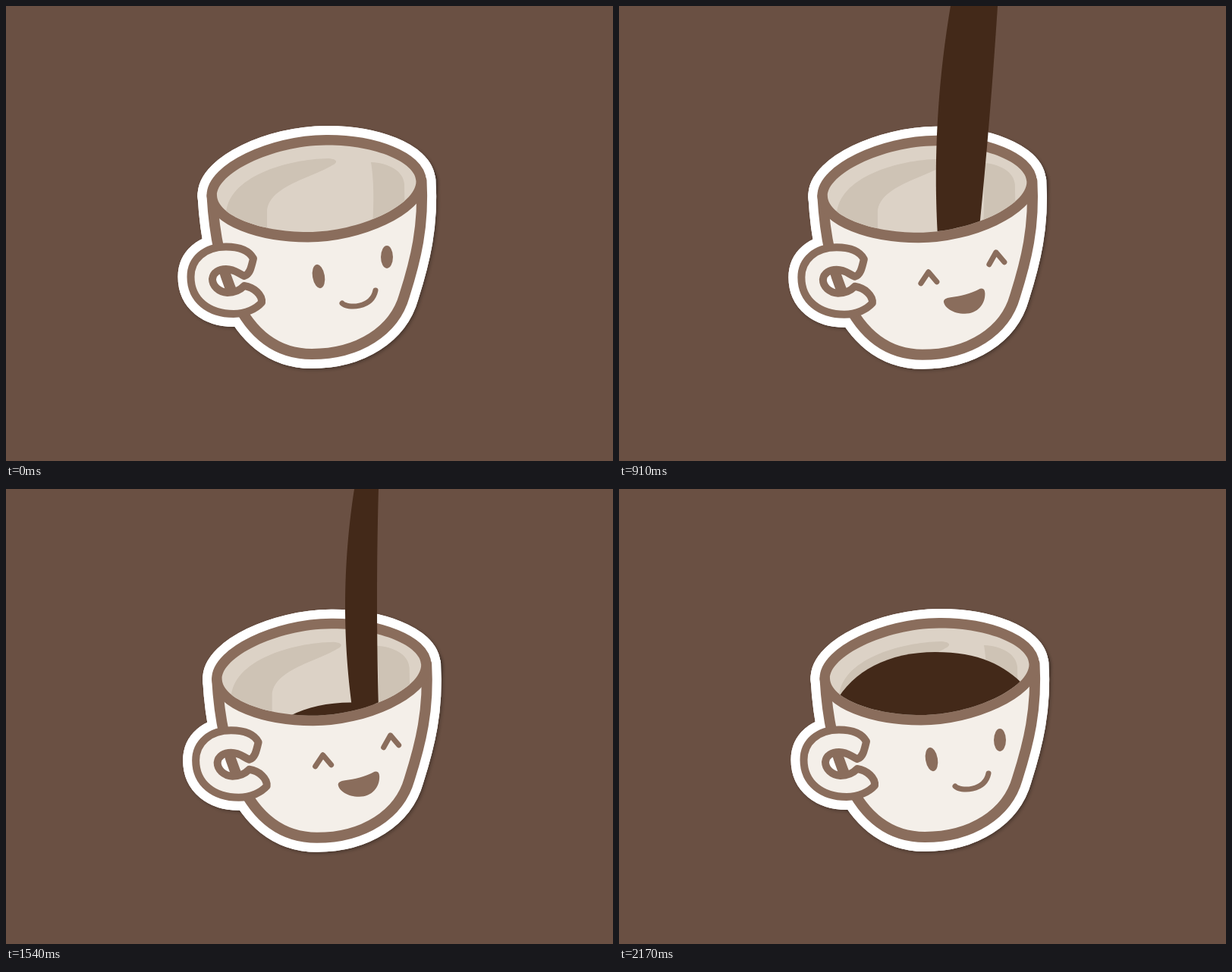
Write an HTML page with a canvas that moves like this. It is 800x600 px and loops after 4340 ms.

```html
<!DOCTYPE html>
<html lang="en">
<head>
<meta charset="utf-8">
<title>Coffee cup</title>
<style>
html, body { margin: 0; width: 100%; height: 100%; overflow: hidden; background: #6a5043; }
canvas { display: block; }
</style>
</head>
<body>
<canvas id="stage" width="800" height="600"></canvas>
<script>
const ctx = document.getElementById('stage').getContext('2d');
const LOOP = 4340, START = 350, STEP = 70, LAST = 26;
const BG = '#6a5043', LINE = '#8a6d5c', CREAM = '#f4efe9', INNER = '#dcd2c6',
      SHADE = '#cec3b5', COFFEE = '#432919';

const body = new Path2D('M271.5 250C276 330 302 459 403 459C465 459 512 428 525 382C540 335 551 290 547.5 230Z');
const front = 'C541 262 466 298 398 298C334 298 279 276 278 250';
const rim = new Path2D('M278 250C277 222 348 184 422 183.5C486 183 540 206 540.5 231' + front + 'Z');
const pourArea = new Path2D('M278 -20L541 -20L540.5 231' + front + 'Z');
const handle = new Path2D('M326 333C320 322 306 317.5 290 317.5C262 317.5 243.5 334 243.5 357' +
  'C243.5 388 268 406 300 406C316 406 330 399 337 391C338 381 327 371 314 369' +
  'C307 376 301 378 292 378C280 377 272 369 272 360C273 351 281 347 290 347' +
  'C302 347 306 353 314 356C321 354 323 346 326 333Z');
const leftShade = new Path2D('M290 275C292 225 370 202 425 201C438 202 437 207 430 210' +
  'C400 228 345 238 344 272L344 300L290 300Z');
const rightShade = new Path2D('M481 206C485 230 485 260 483 290L526 290L525 235C524 218 505 207 481 206Z');
const surface = new Path2D('M285 282C308 240 355 215 417 215C474 215 508 232 535 260L560 340L285 340Z');
const smile = new Path2D('M443 392C450 399 482 399 487 375');
const happyEyes = new Path2D('M401 365L411 350L422 363M491 340L500 324L511 337');
const laugh = new Path2D('M431 389Q431 384.5 440 383.5C453 382 466 379 479 372' +
  'Q485 370 485.5 378C486 392 476 405 459 405C443 405 432 397 431 389Z');

// Stream poses: step, x at top, middle and foot, width at top and middle
const poses = [
  [4, 487.5, 471, 473, 41, 56],
  [8, 468, 454, 447, 62, 68],
  [11, 451, 446.5, 459.5, 54, 73],
  [17, 475, 468, 474.5, 32, 42],
  [21, 485, 494.5, 500, 52, 42]
];

function poseAt(k) {
  const at = Math.max(poses[0][0], Math.min(poses[poses.length - 1][0], k));
  const i = Math.max(1, poses.findIndex(p => p[0] >= at));
  const a = poses[i - 1], b = poses[i], p = (at - a[0]) / (b[0] - a[0]);
  return a.slice(1).map((v, j) => v + (b[j + 1] - v) * p);
}

// Parabola through three values at u = 0, 0.5 and 1
const bend = (a, b, c, u) => a * (1 - u) * (1 - 2 * u) + 4 * b * u * (1 - u) + c * u * (2 * u - 1);

function sway(k) {
  if (k < 0) return [0, 0];
  const fade = Math.max(0, Math.min(1, (24 - k) / 3));
  return [
    fade * (2.2 - 5.5 * Math.cos(2 * Math.PI * (k - 7) / 25)),
    fade * (.5 + 1.6 * Math.cos(2 * Math.PI * (k - 4.5) / 16))
  ];
}

function fill(path, color) {
  ctx.fillStyle = color;
  ctx.fill(path);
}

function stroke(path, width, color) {
  ctx.strokeStyle = color;
  ctx.lineWidth = width;
  ctx.stroke(path);
}

function eye(x, y, ry, turn) {
  ctx.fillStyle = LINE;
  ctx.beginPath();
  ctx.ellipse(x, y, 8, ry, turn, 0, Math.PI * 2);
  ctx.fill();
}

function sticker() {
  for (const [path, width] of [[body, 38], [rim, 51], [handle, 34]]) {
    fill(path, '#fff');
    stroke(path, width, '#fff');
  }
}

function drawCup(k) {
  ctx.save();
  ctx.shadowColor = 'rgba(0,0,0,.3)';
  ctx.shadowBlur = 4;
  ctx.shadowOffsetX = ctx.shadowOffsetY = 2;
  sticker();
  ctx.restore();
  sticker();

  fill(body, CREAM);
  stroke(body, 14, LINE);
  stroke(rim, 27, LINE);
  fill(rim, INNER);

  ctx.save();
  ctx.clip(rim);
  fill(leftShade, SHADE);
  fill(rightShade, SHADE);
  const drop = 7.3 * (LAST - k);
  ctx.translate(drop * .47, drop);
  fill(surface, COFFEE);
  ctx.restore();

  fill(handle, CREAM);
  stroke(handle, 10, LINE);
}

function drawFace(happy) {
  if (happy) {
    stroke(happyEyes, 7, LINE);
    fill(laugh, LINE);
  } else {
    eye(412, 356.5, 15.8, -.17);
    eye(502, 331, 15, 0);
    stroke(smile, 7, LINE);
  }
}

function drawStream(k) {
  const top = Math.max(0, (k - 23) * 110);
  const foot = Math.min(310, 90 + k * 110);
  const [x0, x1, x2, w0, w1] = poseAt(k);
  const taper = gap => Math.min(1, Math.sqrt(gap / 60));
  const left = [], right = [];
  for (let y = top; y <= foot; y += 5) {
    const u = y / 300, x = bend(x0, x1, x2, u);
    let half = bend(w0, w1, w1 * .8, u) / 2;
    if (foot < 310) half *= taper(foot - y);
    if (top > 0) half *= taper(y - top);
    left.push([x - half, y]);
    right.unshift([x + half, y]);
  }
  ctx.fillStyle = COFFEE;
  ctx.beginPath();
  for (const [x, y] of left.concat(right)) ctx.lineTo(x, y);
  ctx.fill();
}

function draw(t) {
  const k = Math.min(LAST, Math.floor((t - START) / STEP));
  const [dx, dy] = sway(k);
  ctx.fillStyle = BG;
  ctx.fillRect(0, 0, 800, 600);
  ctx.lineCap = ctx.lineJoin = 'round';
  ctx.save();
  ctx.translate(dx, dy);
  drawCup(k);
  drawFace(k >= 2 && k < LAST);
  if (k >= 0 && k < LAST) {
    ctx.clip(pourArea);
    ctx.translate(-dx, -dy);
    drawStream(k);
  }
  ctx.restore();
}

const begin = performance.now();
function tick() {
  draw((performance.now() - begin) % LOOP);
  requestAnimationFrame(tick);
}
tick();
</script>
</body>
</html>
```
